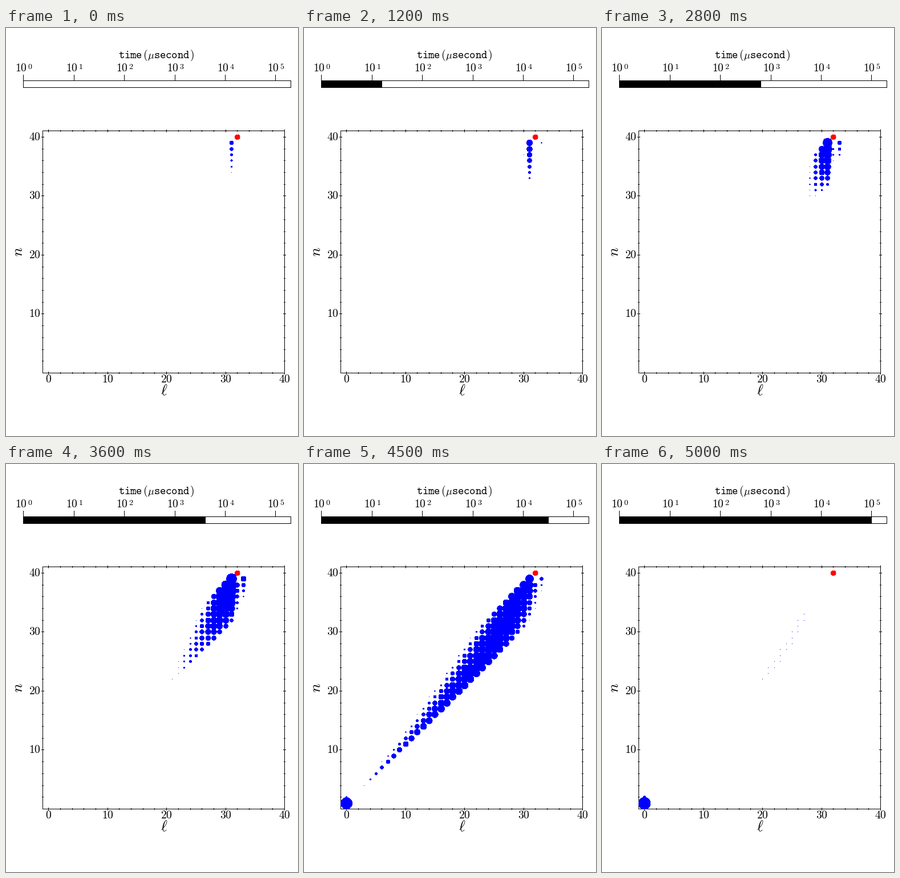
These frames come from a looping animation (512 by 716 pixels, 5.1 s). A matplotlib script:

```python
"""Radiative cascade of a hydrogen atom from n=40, l=32, on a log time scale."""
import math

import matplotlib.pyplot as plt
import numpy as np
from matplotlib.animation import FuncAnimation
from matplotlib.patches import Rectangle

W, H, DPI = 512, 716, 100
FRAMES, INTERVAL = 51, 100
N0, L0 = 40, 32
FLOOR = 1e-6            # smallest population that gets a dot
PX_PER_DECADE = 3.55    # dot diameter per decade above the floor
ALPHA = 1 / 137.036
AU_PER_US = 4.1341e10   # atomic units of time in a microsecond

plt.rcParams["mathtext.fontset"] = "cm"


# ---- physics ----

def radial(n, l, r):
    """Normalised radial function r * R_nl(r)."""
    x, k, a = 2 * r / n, n - l - 1, 2 * l + 1
    prev, lag = np.zeros_like(x), np.ones_like(x)
    for j in range(k):
        prev, lag = lag, ((2 * j + 1 + a - x) * lag - (j + a) * prev) / (j + 1)
    log_norm = 0.5 * (math.lgamma(k + 1) - math.lgamma(n + l + 1)) - math.log(n)
    return np.exp(log_norm + (l + 1) * np.log(x) - x / 2) * lag


def rate_matrix(states):
    """Electric dipole decay rates between all states, per microsecond."""
    s = np.linspace(0, 71, 2401)[1:]
    r = s * s
    weight = r * 2 * s * (s[1] - s[0])
    wave = {st: radial(*st, r) for st in states}
    index = {st: i for i, st in enumerate(states)}
    rates = np.zeros((len(states), len(states)))
    for (n, l), i in index.items():
        for l2 in (l - 1, l + 1):
            for n2 in range(max(l2 + 1, 1), n):
                if (n2, l2) not in index:
                    continue
                dipole = np.sum(wave[n, l] * wave[n2, l2] * weight)
                omega = 0.5 * (1 / n2**2 - 1 / n**2)
                a = (4 / 3 * (ALPHA * omega)**3 * max(l, l2) / (2 * l + 1)
                     * dipole**2 * AU_PER_US)
                rates[index[n2, l2], i] += a
                rates[i, i] -= a
    return rates


def evolve(states, steps=1024):
    """Populations at 10**(k/10) microseconds for each frame k."""
    rates = rate_matrix(states)
    eye = np.eye(len(states))
    pop = np.array([float(st == (N0, L0)) for st in states])
    t, rows = 0.0, []
    for k in range(FRAMES):
        t_next = 10 ** (k / 10)
        small = np.linalg.inv(eye - rates * (t_next - t) / steps)
        pop = np.linalg.matrix_power(small, steps) @ pop
        rows.append(pop)
        t = t_next
    return np.array(rows)


# n - l never grows during the decay, so this band holds every reachable state
states = [(n, l) for n in range(1, N0 + 1)
          for l in range(max(0, n - (N0 - L0)), n)]
pops = evolve(states)


# ---- stage, in pixel coordinates with y downwards ----

fig = plt.figure(figsize=(W / DPI, H / DPI), dpi=DPI, facecolor="white")
ax = fig.add_axes([0, 0, 1, 1])
ax.set_xlim(0, W)
ax.set_ylim(H, 0)
ax.axis("off")


def pos_x(l):
    return 74.6 + 10.35 * l


def pos_y(n):
    return 605.4 - 10.35 * n


def px_t(decade):
    return int(30.75 + 88.42 * decade)


def block(x0, y0, x1, y1):
    """Black rectangle covering pixels x0..x1, y0..y1 inclusive."""
    return ax.add_patch(Rectangle((x0, y0), x1 - x0 + 1, y1 - y0 + 1,
                                  fc="black", ec="none", lw=0,
                                  antialiased=False, zorder=2))


def outline(x0, y0, x1, y1):
    for box in ((x0, y0, x1, y0), (x0, y1, x1, y1),
                (x0, y0, x0, y1), (x1, y0, x1, y1)):
        block(*box)


def symbol(x, y, tex, px, **kw):
    ax.text(x, y, f"${tex}$", fontsize=px * 72 / DPI, color="black", **kw)


def label(x, y, text, px=19.7, ha="left"):
    """Typewriter text with its baseline at y."""
    symbol(x, y, rf"\mathtt{{{text}}}", px, ha=ha, va="baseline")


def scatter(x, y, diameter, color, zorder):
    return ax.scatter(x, y, s=area(diameter), c=color, edgecolors="none",
                      linewidths=0, antialiased=False, zorder=zorder)


def area(diameter):
    """Scatter size for a diameter in pixels."""
    return (np.asarray(diameter) * 72 / DPI) ** 2


# time scale
outline(30, 92, 499, 104)
label(197, 53, "time")
label(244, 53, "(", ha="center")
symbol(254, 53, r"\mu", 18, ha="center", va="baseline")
label(259, 53, "second")
label(326, 53, ")", ha="center")
for d in range(6):
    x = px_t(d)
    block(x, 82, x, 92)
    label(x - 14, 76, "10")
    label(x + 8, 72, str(d), px=14)

# plot frame
LEFT, TOP, RIGHT, BOTTOM = 64, 180, 488, 605
outline(LEFT, TOP, RIGHT, BOTTOM)
for v in range(0, 41, 2):
    half = 2 if v % 10 == 0 else 1
    x, y = int(pos_x(v)), int(pos_y(v))
    for edge in (TOP, BOTTOM):
        block(x, edge - half, x, edge + half)
    if v:
        for edge in (LEFT, RIGHT):
            block(edge - half, y, edge + half, y)
    if v % 10 == 0:
        label(x + 0.5, 622, str(v), ha="center")
        if v:
            label(61, y + 6, str(v), ha="right")
symbol(277, 637.5, r"\ell", 26, ha="center", va="center")
symbol(22, 393, "n", 26, ha="center", va="center", rotation=90)

# moving parts; blue dots sit on pixel centres
bar = block(30, 92, 30, 104)
dots = scatter([int(pos_x(l)) + 0.5 for n, l in states],
               [int(pos_y(n)) + 0.5 for n, l in states],
               np.zeros(len(states)), "#0000ff", 3)
scatter([pos_x(L0)], [pos_y(N0)], [8.5], "#ff0000", 4)
start = states.index((N0, L0))


def draw(k):
    bar.set_width(px_t(k / 10) - 30 + 1)
    decades = np.log10(np.maximum(pops[k], 1e-30) / FLOOR)
    # aliased fills cover every touched pixel, hence the small inset
    size = np.where(decades > 0, np.maximum(PX_PER_DECADE * decades - 0.5, 0.5), 0)
    size[start] = 0
    dots.set_sizes(area(size))
    return bar, dots


anim = FuncAnimation(fig, draw, frames=FRAMES, interval=INTERVAL,
                     repeat=True, repeat_delay=0, cache_frame_data=False)
plt.show()
```
